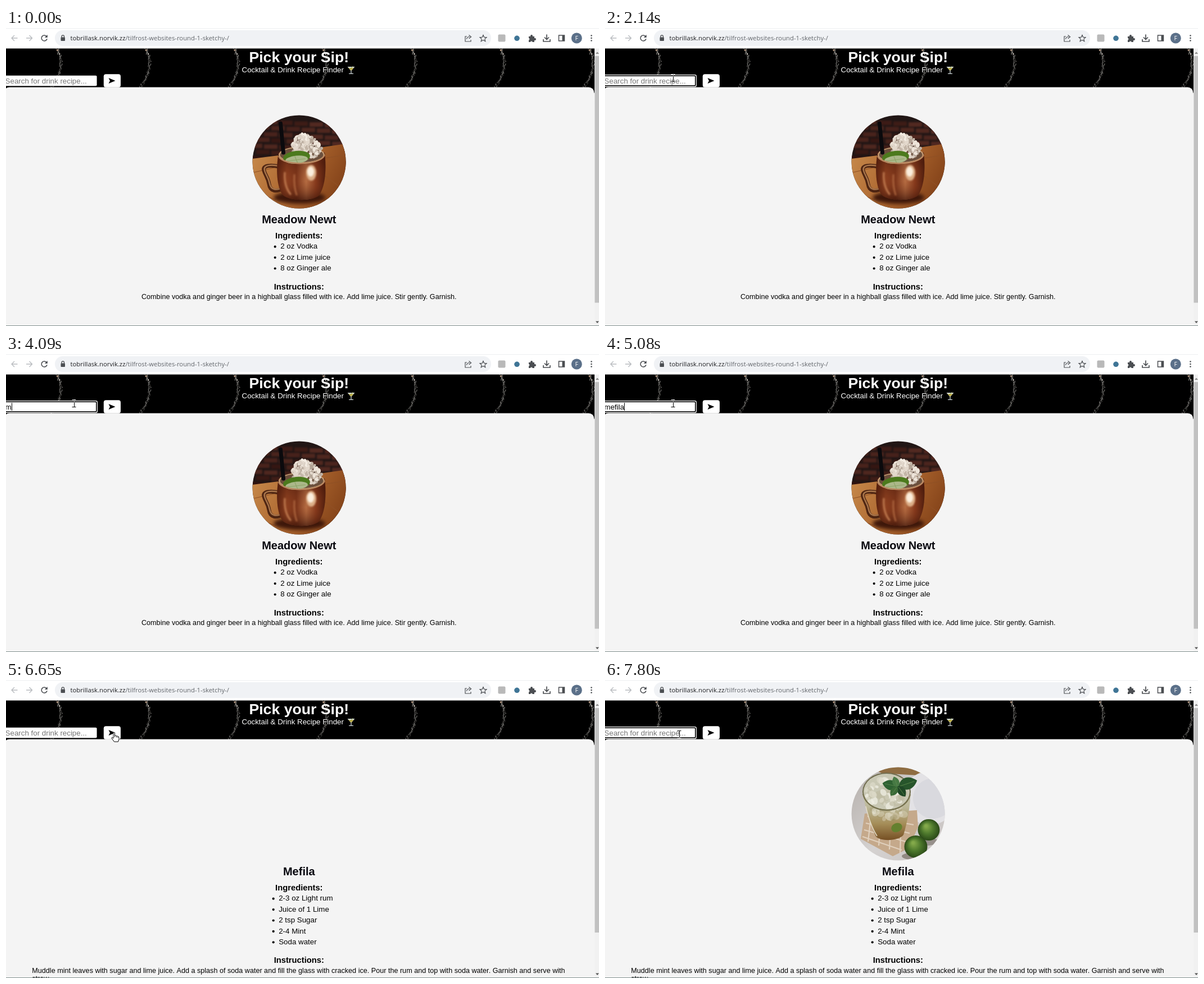
An HTML page with a canvas that plays this animation: 1055 px wide and 531 px high, repeating every 8 s.

```html
<!DOCTYPE html>
<html lang="en">
<head>
<meta charset="utf-8">
<title>Drink finder</title>
<style>
html, body { margin: 0; width: 100%; height: 100%; overflow: hidden; background: #fff; }
canvas { display: block; width: 1055px; height: 531px; }
</style>
</head>
<body>
<canvas id="stage" width="1055" height="531"></canvas>
<script>
const W = 1055, H = 531, LOOP = 8000, MID = 521.3;
const c = document.getElementById('stage').getContext('2d');
const SANS = '"Liberation Sans", Arial, sans-serif';
const UI = '"Open Sans", "Noto Sans", sans-serif';

const FIRST = {
  name: 'Meadow Newt', listX: 488.2, thumbEnd: 489.5,
  items: ['2 oz Vodka', '2 oz Lime juice', '8 oz Ginger ale'],
  headY: 465.5, stepsX: 241,
  steps: ['Combine vodka and ginger beer in a highball glass filled with ice. Add lime juice. Stir gently. Garnish.']
};
const SECOND = {
  name: 'Mefila', listX: 485.2, thumbEnd: 450,
  items: ['2-3 oz Light rum', 'Juice of 1 Lime', '2 tsp Sugar', '2-4 Mint', 'Soda water'],
  headY: 504, stepsX: 46.3,
  steps: ['Muddle mint leaves with sugar and lime juice. Add a splash of soda water and fill the glass with cracked ice. Pour the rum and top with soda water. Garnish and serve with', 'straw.']
};
const WORD = 'mefila';
const KEY_TIMES = [4090, 4350, 4550, 4750, 4950, 5080];
const FOCUS = [[2140, 6180], [7660, LOOP]];
const RESULT_AT = 6650, PHOTO_AT = 6850;

// time, x, y of the pointer
const PATH = [
  [380, 678, 390], [450, 588, 356], [645, 588, 356], [850, 310, 112],
  [1050, 300, 110], [1390, 118.5, 86], [1800, 118.5, 87], [1940, 120.5, 90],
  [2420, 120.5, 88], [5600, 120.5, 88], [6100, 191, 92], [6250, 191, 93],
  [7200, 191, 93], [7600, 134, 96], [7800, 131.5, 97]
];

function random(seed) {
  return () => (seed = (seed * 16807) % 2147483647) / 2147483647;
}

function text(s, x, y, size, color = '#000', align = 'left', weight = 400, family = SANS) {
  c.font = `${weight} ${size}px ${family}`;
  c.fillStyle = color;
  c.textAlign = align;
  c.fillText(s, x, y);
}

function box(x, y, w, h, color, r = 0) {
  c.fillStyle = color;
  c.beginPath();
  c.roundRect(x, y, w, h, r);
  c.fill();
}

function oval(x, y, rx, ry, color, turn = 0) {
  c.fillStyle = color;
  c.beginPath();
  c.ellipse(x, y, rx, ry, turn, 0, 7);
  c.fill();
}

function shape(d, fill) {
  c.fillStyle = fill;
  c.fill(new Path2D(d));
}

function line(d, color, width = 1.5) {
  c.strokeStyle = color;
  c.lineWidth = width;
  c.stroke(new Path2D(d));
}

function blend(x0, y0, x1, y1, ...colors) {
  const g = c.createLinearGradient(x0, y0, x1, y1);
  colors.forEach((k, i) => g.addColorStop(i / (colors.length - 1), k));
  return g;
}

function blurred(px, draw) {
  c.filter = `blur(${px}px)`;
  draw();
  c.filter = 'none';
}

function toolbar() {
  const ink = '#4b4e52';
  box(0, 0, W, 36.4, '#fff');
  box(0, 0, W, 1, '#eceef0');
  box(87, 4, 776, 28, '#f0f2f5', 14);
  line('M20.500 18H10M15 13L10 18L15 23', '#b9bcc0', 1.4);
  line('M36 18H46.500M41.500 13L46.500 18L41.500 23', '#b9bcc0', 1.4);
  line('M72.300 15.200A5 5 0 1 0 73 19.200', ink, 1.6);
  shape('M73.800 12V17H68.800Z', ink);
  box(97.500, 16.500, 7.500, 6.500, ink, 1);
  line('M99 17V15.200A2.250 2.250 0 0 1 103.500 15.200V17', ink, 1.3);
  text('tobrillask.norvik.zz', 114.5, 22, 11.3, '#202124', 'left', 400, UI);
  const x = 114.5 + c.measureText('tobrillask.norvik.zz').width;
  text('/tilfrost-websites-round-1-sketchy-/', x, 22, 11.3, '#62666b', 'left', 400, UI);

  line('M820 15H817V24H827V21M819.500 20C820 16.500 822 15.500 825 15.500M823.500 12.500L827.500 15.700L823.500 19', ink, 1.2);
  line('M849 12.500L850.700 16.400L855 16.800L851.800 19.600L852.800 23.700L849 21.500L845.200 23.700L846.200 19.600L843 16.800L847.300 16.400Z', ink, 1.2);
  box(875.5, 11.5, 13, 13, '#b9b9b9', 2);
  oval(909, 18.3, 4.8, 4.8, '#3f7596');
  shape('M930 15H933V14A2 2 0 0 1 937 14V15H940V18H941A2 2 0 0 1 941 22H940V25H936.500A1.800 1.800 0 0 0 933 25H930V21.500A1.800 1.800 0 0 0 930 18Z', ink);
  line('M962 11.500V20M958 16.500L962 20.500L966 16.500M956 20V24H968V20', ink, 1.7);
  line('M983.500 13H993.500V23H983.500Z', ink, 1.5);
  box(989.5, 13, 4.5, 10, ink);
  oval(1015.3, 18, 9.5, 9.5, '#5b7089');
  text('F', 1015.3, 22, 10.5, '#fff', 'center', 400, UI);
  for (const y of [13.5, 18, 22.5]) oval(1041.5, y, 1.3, 1.3, ink);
}

function chain(x, seed) {
  const rnd = random(seed);
  for (let i = 0; i < 90; i++) {
    const u = i / 89;
    const px = x + 34 * u * (1 - u) - 11 * u * u;
    const py = 37 + 69 * u;
    const g = 75 + rnd() * 115 | 0;
    c.globalAlpha = 0.85 - 0.25 * u;
    oval(px + (rnd() - 0.5) * 3 + (i % 2 ? 1.3 : -1.3), py, 0.6 + rnd() * 0.45, 0.9, `rgb(${g},${g - 2},${g - 6})`);
  }
  c.globalAlpha = 1;
  oval(x + 0.5, 39.5, 1.7, 1.7, '#a88e79');
  oval(x + 4.5, 46, 0.9, 1.6, '#cfc7bf');
}

function header() {
  box(0, 36, 1047, 80, '#000');
  for (let k = 0; k < 7; k++) chain(91 + 157.8 * k, 41);
  text('Pick your Sip!', MID, 61, 26.67, '#fff', 'center', 700);
  text('Cocktail & Drink Recipe Finder', 419.5, 79.3, 13.33, '#fff');
  shape('M607.500 69H620.500L614 76.500Z', '#d5dcd8');
  shape('M609.500 71H618.500L614 76Z', '#c3b348');
  line('M614 76V81M610 81.300H618', '#c9d2d4', 1.3);
  line('M617.500 67.500L612.500 73', '#8a9a4b', 1);
}

function search(t, focused) {
  if (focused) {
    box(-4, 83, 167, 22, '#fff', 3);
    box(-4, 84.2, 165.8, 19.6, '#101010', 2);
    box(-4, 86, 164, 16, '#fff', 1);
  } else {
    box(-4, 84.7, 165.6, 18.6, '#fff', 2);
  }
  const typed = t < RESULT_AT ? WORD.slice(0, KEY_TIMES.filter(k => t >= k).length) : '';
  text(typed || 'Search for drink recipe...', -1.4, 98.5, 13.33, typed ? '#000' : '#757575');
  if (typed && focused) box(Math.round(c.measureText(typed).width - 1.4), 87, 1, 14, '#000');
  box(173.8, 82.3, 30.2, 23.4, '#fff', 4);
  shape('M182.500 89L194.500 94L182.500 99L185 94Z', '#000');
}

function inCircle(draw) {
  c.save();
  c.beginPath();
  c.arc(521.6, 238.5, 83, 0, 7);
  c.clip();
  draw();
  c.restore();
}

function crushed(x, y, rx, ry, n, size, seed, tones) {
  const rnd = random(seed);
  for (let i = 0; i < n; i++) {
    const a = rnd() * 6.283, d = Math.sqrt(rnd()), s = size * (0.5 + rnd());
    oval(x + Math.cos(a) * rx * d, y + Math.sin(a) * ry * d, s, s * 0.75, tones[i % tones.length], rnd() * 3);
  }
}

function brickWall() {
  const rnd = random(7);
  for (let row = 0; row < 7; row++)
    for (let k = 0; k < 7; k++) {
      const g = 28 + rnd() * 34 + k * 3 | 0;
      box(432 + k * 27 + (row % 2) * 13, 162 + row * 11 + k * 1.5, 24, 8, `rgb(${g + 18},${g * 0.65 | 0},${g * 0.52 | 0})`);
    }
}

function copperPhoto() {
  box(438, 155, 168, 168, '#211615');
  blurred(1.5, brickWall);
  shape('M438 233L485 227L565 212L606 206V323H438Z', blend(440, 230, 600, 315, '#c58749', '#a9632d', '#7c3c15'));
  line('M438 258L485 247M566 232L606 226M560 258L606 292M438 290L480 306M550 300L580 322', '#8f5025', 1.2);
  blurred(3, () => oval(522, 302, 46, 11, '#3d170a'));
  c.lineCap = 'round';
  line('M486 247C472 244 456 244 459 254C461 262 466 266 468 278C470 292 482 292 492 286', '#4e2512', 7);
  line('M486 246C472 243 457 244 460 254C462 262 467 266 469 277C471 289 482 290 492 284', '#a9764c', 2.5);
  const body = 'M485 222C480 250 481 284 493 298C506 309 546 309 557 298C569 280 570 250 567 222Z';
  shape(body, blend(482, 0, 569, 0, '#59210f', '#8c3f1f', '#7c351a', '#b56c42', '#85381b', '#4d1c0d'));
  shape(body, blend(0, 240, 0, 306, 'rgba(60,20,8,.3)', 'rgba(130,60,30,0)', 'rgba(48,14,6,.65)'));
  oval(526, 226, 41, 15, '#c39a72');
  oval(526, 226, 38.5, 13, '#6b4f3c');
  const ice = ['#d9cdc0', '#c3b5a7', '#eee5da', '#b3a496', '#e3d8cc'];
  crushed(534, 216, 27, 16, 110, 3.4, 23, ice);
  crushed(531, 203, 21, 13, 90, 2.8, 9, ice);
  crushed(530, 194, 11, 6, 30, 2.4, 15, ['#f3ece2', '#ddd2c6']);
  oval(517, 230, 24, 11, '#4c7a1d', -0.1);
  oval(517, 234.5, 20, 7, '#abb88a', -0.1);
  line('M500 237L532 233M514 229L519 241', '#8da367', 1.2);
  line('M488.500 170L493.500 222', '#0b0a0d', 7);
  line('M485.500 229C493 246 558 245 566.500 227', '#b98760', 2.5);
  blurred(1.5, () => {
    oval(543, 258, 9, 14, '#dcae87');
    oval(542, 256, 6, 9, '#fbeedd');
    line('M496 258C495 274 499 287 506 296', '#c07b50', 3);
    line('M513 262C512 278 514 288 517 297', '#a9623c', 3);
  });
  c.lineCap = 'butt';
}

function leaf(x, y, len, turn, color) {
  c.save();
  c.translate(x, y);
  c.rotate(turn);
  shape(`M0 0C${len * 0.25} ${-len * 0.45} ${len * 0.7} ${-len * 0.4} ${len} 0C${len * 0.7} ${len * 0.4} ${len * 0.25} ${len * 0.4} 0 0`, color);
  line(`M2 0H${len * 0.85}`, '#5d8a4e', 0.8);
  c.restore();
}

function lime(x, y, r) {
  const g = c.createRadialGradient(x - 5, y - 7, 2, x, y, r);
  g.addColorStop(0, '#83a94a');
  g.addColorStop(0.5, '#4d782c');
  g.addColorStop(1, '#294817');
  oval(x, y, r, r * 0.98, g);
}

function mintPhoto() {
  box(438, 155, 168, 168, blend(445, 180, 600, 310, '#b9b4b0', '#d5d2d1', '#c8c3c1'));
  shape('M470 155H575L558 170L492 166Z', '#8f6d42');
  oval(578, 210, 48, 48, '#e3e2e5', 0.2);
  oval(584, 211, 36, 36, '#d9d9de', 0.2);
  shape('M462 238L555 232L557 262L540 300L512 314L455 283Z', '#c5a98b');
  for (let i = 0; i < 4; i++) line(`M${458 + i * 3} ${279 - i * 12}L${528 + i * 7} ${303 - i * 15}M${473 + i * 18} ${244 - i}L${468 + i * 19} ${288 + i * 7}`, '#e0d0bd', 2.2);
  shape('M458 198C463 230 473 260 482 279C492 289 524 286 531 276C538 253 543 225 544 198Z', blend(0, 198, 0, 285, '#cdcbb8', '#bbb797', '#a58d58', '#765024'));
  crushed(503, 232, 30, 20, 38, 6, 31, ['rgba(238,235,222,.5)', 'rgba(150,139,95,.3)', 'rgba(220,214,190,.45)']);
  oval(501, 199, 43, 34, '#706d4f');
  oval(501, 199, 41, 32, '#c9c8b4');
  crushed(498, 202, 34, 24, 55, 6, 17, ['rgba(240,239,229,.75)', 'rgba(193,190,165,.7)', 'rgba(220,218,200,.75)']);
  line('M459 203C467 240 534 242 543 204', '#78734f', 2);
  line('M464 225C470 252 477 267 484 278', '#e4ddca', 1.5);
  oval(519, 263, 10, 8, '#64802f', -0.4);
  leaf(522, 190, 35, -0.32, '#27552b');
  leaf(522, 190, 29, 3.35, '#2f6232');
  leaf(521, 191, 20, 4.35, '#477944');
  leaf(521, 189, 23, 0.95, '#1f4725');
  leaf(520, 190, 20, 2.2, '#3a6a36');
  oval(570, 288, 24, 7, '#97918c');
  oval(555, 314, 27, 7, '#918982');
  lime(576, 267, 19.5);
  lime(553, 297, 20.5);
}

function recipe(r, photo) {
  box(-4, 105.4, 1050.5, 440, '#f4f4f4', 10);
  box(0, 130, 1047, 410, '#f4f4f4');
  if (photo) inCircle(photo);
  text(r.name, MID, 348, 20, '#08080f', 'center', 700);
  text('Ingredients:', MID, 375, 14.76, '#000', 'center', 700);
  r.items.forEach((s, i) => {
    const y = 393.3 + i * 19.4;
    oval(r.listX - 9.5, y - 3.6, 2.1, 2.1, '#000');
    text(s, r.listX, y, 13.33);
  });
  text('Instructions:', MID, r.headY, 14.76, '#000', 'center', 700);
  r.steps.forEach((s, i) => text(s, r.stepsX, r.headY + 17.6 + i * 14, 12.62));
}

function scrollbar(end) {
  box(1047, 36, 8, H - 36, '#f1f1f1');
  box(1047.5, 50, 7.5, end - 50, '#c1c1c1');
  shape('M1049 46H1055L1052 42.500Z', '#8a8a8a');
  shape('M1049 522.500H1055L1052 526Z', '#505050');
  box(0, 530, W, 1, '#81908f');
}

function pointerAt(t) {
  if (t < PATH[0][0]) return null;
  for (let i = 1; i < PATH.length; i++) {
    const [t0, x0, y0] = PATH[i - 1], [t1, x1, y1] = PATH[i];
    if (t < t1) {
      const u = (t - t0) / (t1 - t0);
      return [x0 + (x1 - x0) * u, y0 + (y1 - y0) * u];
    }
  }
  return PATH[PATH.length - 1].slice(1);
}

function pointer(t) {
  const p = pointerAt(t);
  if (!p) return;
  const [x, y] = p.map(Math.round);
  c.save();
  c.translate(x, y);
  if (x < 162 && y > 84 && y < 104) {
    c.globalCompositeOperation = 'difference';
    line('M-3.500 -6.500H3.500M.5 -6V6M-3.500 6.500H3.500', '#fff', 1);
  } else if (x >= 174 && x <= 204 && y < 106) {
    const hand = 'M0 1.500C0 0 2.500 0 2.500 1.500V6.500C4 5.500 5.500 6 5.500 7C7 6.300 8 7 8 8C9.500 7.500 10 8.500 10 9.500V12.500L8.500 17H1.500L-3 10.800C-3.500 9.300 -2 8.500 0 11Z';
    shape(hand, '#fff');
    line(hand, '#000', 1);
    line('M2.500 6V9M5.500 7V9.500M8 8V10', '#000', 0.8);
  } else {
    const arrow = 'M.5 .5V14L3.700 11L5.800 15.700L8 14.700L5.900 10.200H10.300Z';
    shape(arrow, '#fff');
    line(arrow, '#000', 1);
  }
  c.restore();
}

function draw(t) {
  const done = t >= RESULT_AT;
  const page = done ? SECOND : FIRST;
  const focused = FOCUS.some(([a, b]) => t >= a && t < b);
  header();
  recipe(page, !done ? copperPhoto : t >= PHOTO_AT ? mintPhoto : null);
  search(t, focused);
  scrollbar(page.thumbEnd);
  toolbar();
  pointer(t);
}

const start = performance.now();
function tick() {
  draw((performance.now() - start) % LOOP);
  requestAnimationFrame(tick);
}
tick();
</script>
</body>
</html>
```
